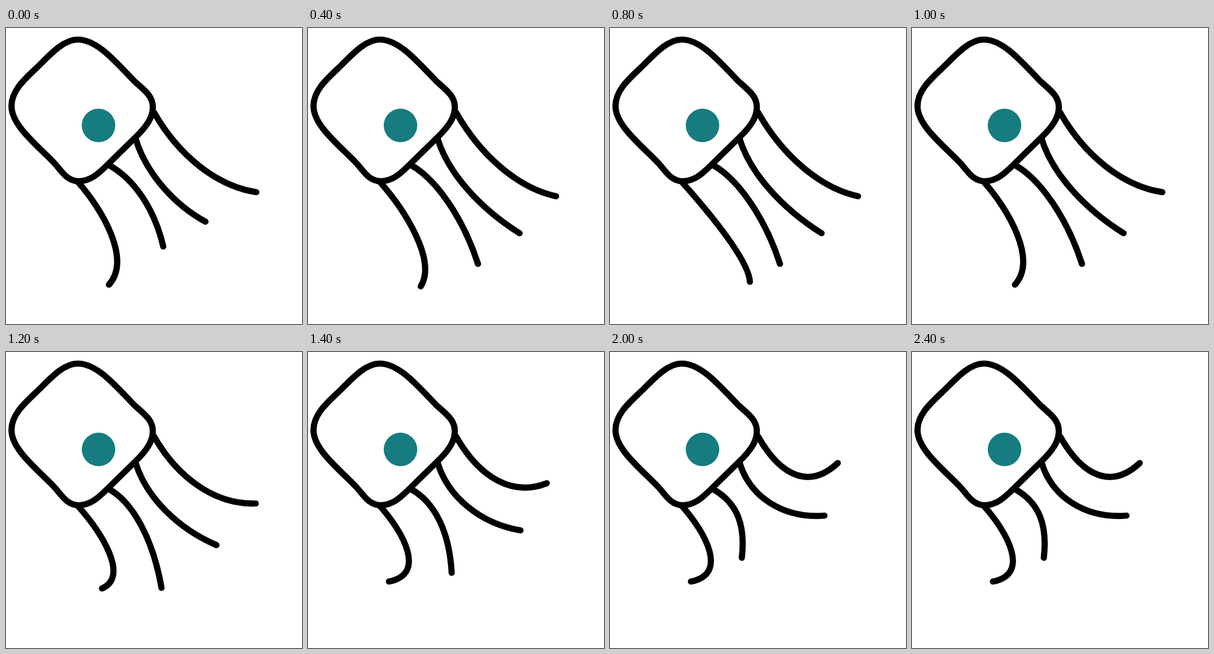
Recreate the animation shown at these times as an HTML page. Size 512 by 512 pixels, loop 2.5 s.

```html
<!DOCTYPE html>
<html lang="en">
<head>
<meta charset="utf-8">
<title>Swimming jelly</title>
<style>
  html, body { margin: 0; width: 100%; height: 100%; overflow: hidden; background: #fff; }
  svg { display: block; width: 100%; height: 100%; }
  .line { fill: none; stroke: #000; stroke-width: 10.7; stroke-linecap: round; stroke-linejoin: round; }
</style>
</head>
<body>
<svg id="stage" viewBox="0 0 512 512">
  <path class="line" d="M124 20C158 20 190 59 222 92C240 108 254 118 254 137
    C254 154 244 170 223 190L175 237C159 253 145 265 126 265
    C104 265 95 245 82 232C52 201 9.5 168 9.5 135C9.5 107 34 87 57 65C78 44 100 20 124 20Z"/>
  <circle cx="160" cy="168.5" r="29" fill="#167c80"/>
</svg>
<script>
const LOOP = 2500, STEP = 200;

// The tip swings along a few points, from stretched to curled.
// The bend of the arm follows: it lies part of the way (pull) from elbow to tip.
// Each digit of beat is the swing at one step, in half points; the last is held.
const arms = [
  { root: "M125 267C165 312 ", elbow: [238, 378], pull: 1 / 3, beat: "442004688",
    tips: [[242, 439], [195, 447], [178, 444], [166, 409], [140, 397]] },
  { root: "M178 237C221 261 ", elbow: [241, 245], pull: 1 / 2, beat: "422022678",
    tips: [[324, 402], [294, 408], [272, 378], [269, 408], [228, 356]] },
  { root: "M224 191C242 251 ", elbow: [264, 291], pull: 1 / 3, beat: "422022678",
    tips: [[370, 366], [366, 355], [345, 335], [364, 334], [371, 283]] },
  { root: "M256 146C297 218 ", elbow: [315, 266], pull: 2 / 5, beat: "442024678",
    tips: [[421, 333], [429, 291], [433, 284], [432, 262], [394, 192]] }
];

const mix = (a, b, k) => a.map((v, i) => v + (b[i] - v) * k);

function along(points, pos) {
  const i = Math.min(Math.floor(pos), points.length - 2);
  return mix(points[i], points[i + 1], pos - i);
}

const stage = document.getElementById("stage");
for (const arm of arms) {
  arm.path = document.createElementNS(stage.namespaceURI, "path");
  arm.path.setAttribute("class", "line");
  stage.append(arm.path);
}

function draw(time) {
  const step = Math.floor((time % LOOP) / STEP);
  for (const { root, elbow, pull, beat, tips, path } of arms) {
    const tip = along(tips, beat[Math.min(step, beat.length - 1)] / 2);
    const bend = mix(elbow, tip, pull);
    path.setAttribute("d", root + [...bend, ...tip].join(" "));
  }
}

const start = performance.now();
function tick() {
  draw(performance.now() - start);
  requestAnimationFrame(tick);
}
tick();
</script>
</body>
</html>
```
